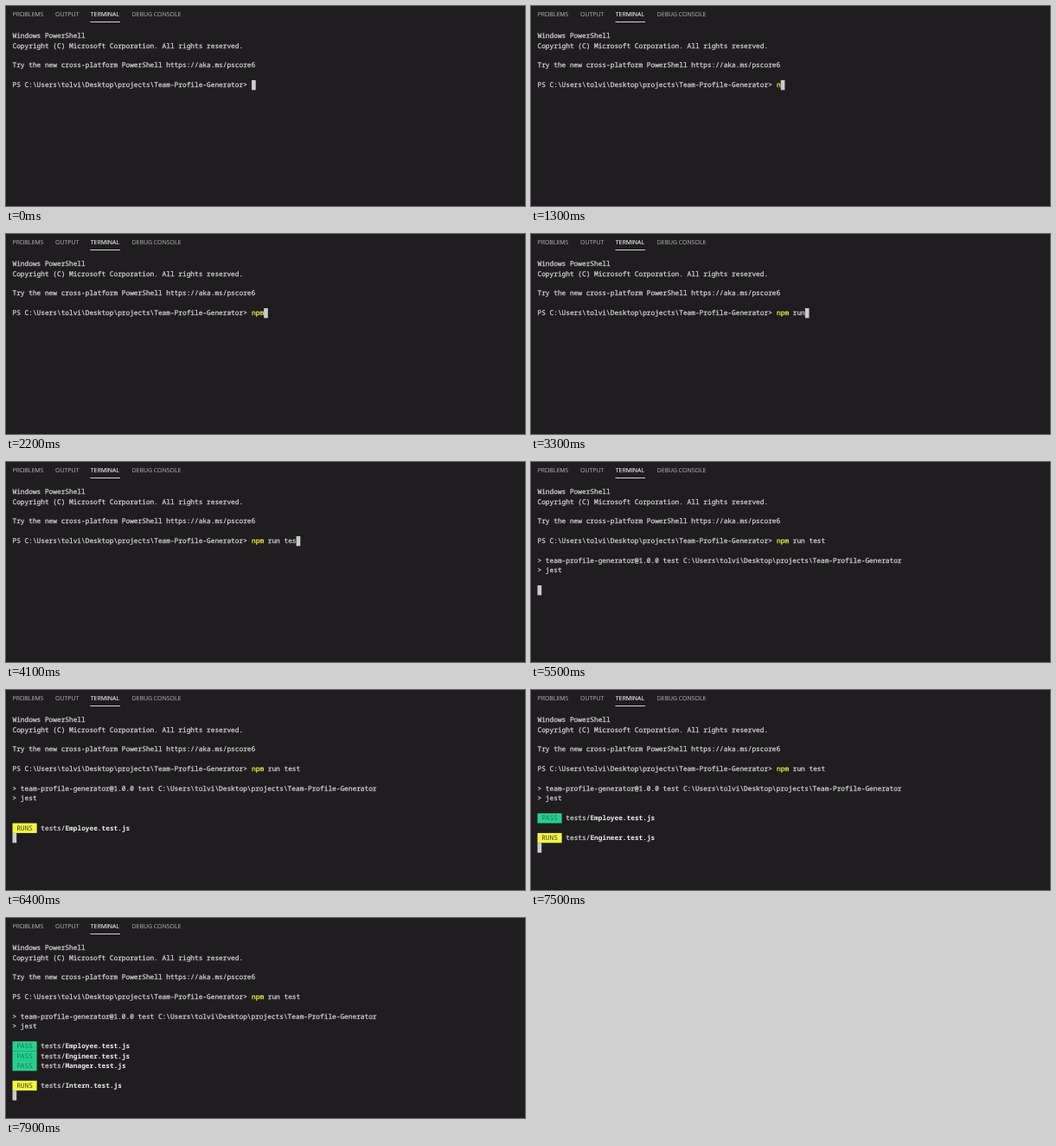
An HTML page for the animation above (8000 ms loop, 600x232 px).

```html
<!DOCTYPE html>
<html lang="en">
<head>
<meta charset="utf-8">
<title>Terminal test run</title>
<style>
  html, body { margin: 0; width: 100%; height: 100%; overflow: hidden; background: #1f1d1f; }
  svg { display: block; width: 600px; height: 232px; }
  text { white-space: pre; text-rendering: geometricPrecision; stroke-width: 0.25px; }
  .tabs text { font: 6.95px "Open Sans", "Noto Sans", sans-serif; fill: #a4a4a4; stroke: #a4a4a4; stroke-width: 0.12px; }
  .tabs .active { fill: #f0f0f0; stroke: #f0f0f0; }
  .tabs rect { fill: #d4d4d4; }
  #screen text { font: 7.81px "Noto Sans Mono", "DejaVu Sans Mono", monospace; fill: #d4d4d4; stroke: #d4d4d4; }
  #screen .command { fill: #f5f543; stroke: #f5f543; }
  #screen .file { fill: #ececec; stroke: none; font-weight: 700; }
  #screen .passText { fill: #1f7452; stroke: none; }
  #screen .runsText { fill: #45441f; stroke: none; }
  .pass { fill: #23d18b; }
  .runs { fill: #f5f543; }
  .cursor { fill: #cccccc; }
</style>
</head>
<body>
<svg viewBox="0 0 600 232">
  <g class="tabs">
    <text x="7.5" y="11.6">PROBLEMS</text>
    <text x="57" y="11.6">OUTPUT</text>
    <text class="active" x="97.7" y="11.6">TERMINAL</text>
    <text x="145.5" y="11.6">DEBUG CONSOLE</text>
    <rect x="97.5" y="18" width="34.5" height="1"/>
  </g>
  <g id="screen"></g>
</svg>
<script>
const LOOP = 8000;
const LEFT = 7.5, TOP = 29, CELL = 4.687, ROW = 11.41, BASE = 8.1;
const FOLDER = 'C:\\Users\\tolvi\\Desktop\\projects\\Team-Profile-Generator';
const PROMPT = `PS ${FOLDER}> `;
const COMMAND = 'npm run test';
const SUITES = ['Employee', 'Engineer', 'Manager', 'Intern'];

// Time at which each character of the command appears.
const KEYS = [1300, 1800, 2200, 2500, 2900, 3100, 3300, 3500, 3700, 3900, 4100, 4300];
const ENTER = 4900, BANNER = 5400;
// Time at which each suite starts; the one before it has then passed.
const STARTS = [6200, 7500, 7700, 7900];

const screen = document.getElementById('screen');
const countUntil = (times, t) => times.filter(time => time <= t).length;

const write = (row, col, string, style = '') =>
  `<text class="${style}" x="${LEFT + col * CELL}" y="${TOP + row * ROW + BASE}">${string}</text>`;

const block = (row, col, cells, style) =>
  `<rect class="${style}" x="${LEFT + col * CELL}" y="${TOP + row * ROW}" width="${cells * CELL}" height="${ROW}"/>`;

const suiteLine = (row, suite, status) =>
  block(row, 0, 6, status) +
  write(row, 1, status.toUpperCase(), status + 'Text') +
  write(row, 7, 'tests/') +
  write(row, 13, suite + '.test.js', 'file');

function draw(t) {
  const typed = COMMAND.slice(0, countUntil(KEYS, t));
  const started = countUntil(STARTS, t);
  let cursor = [5, PROMPT.length + typed.length];

  let out = write(0, 0, 'Windows PowerShell') +
    write(1, 0, 'Copyright (C) Microsoft Corporation. All rights reserved.') +
    write(3, 0, 'Try the new cross-platform PowerShell https://aka.ms/pscore6') +
    write(5, 0, PROMPT.replace('>', '&gt;')) +
    write(5, PROMPT.length, typed.slice(0, 3), 'command') +
    write(5, PROMPT.length + 4, typed.slice(4));

  if (t >= ENTER) cursor = [6, 0];
  if (t >= BANNER) {
    out += write(7, 0, `&gt; team-profile-generator@1.0.0 test ${FOLDER}`) + write(8, 0, '&gt; jest');
    cursor = [10, 0];
  }
  if (started) {
    const passed = started - 1;
    SUITES.slice(0, passed).forEach((suite, i) => out += suiteLine(10 + i, suite, 'pass'));
    out += suiteLine(11 + passed, SUITES[passed], 'runs');
    cursor = [12 + passed, 0];
  }
  return out + block(...cursor, 1, 'cursor');
}

const begin = performance.now();
let shown = '';
function tick() {
  const next = draw((performance.now() - begin) % LOOP);
  if (next !== shown) screen.innerHTML = shown = next;
  requestAnimationFrame(tick);
}
tick();
</script>
</body>
</html>
```
